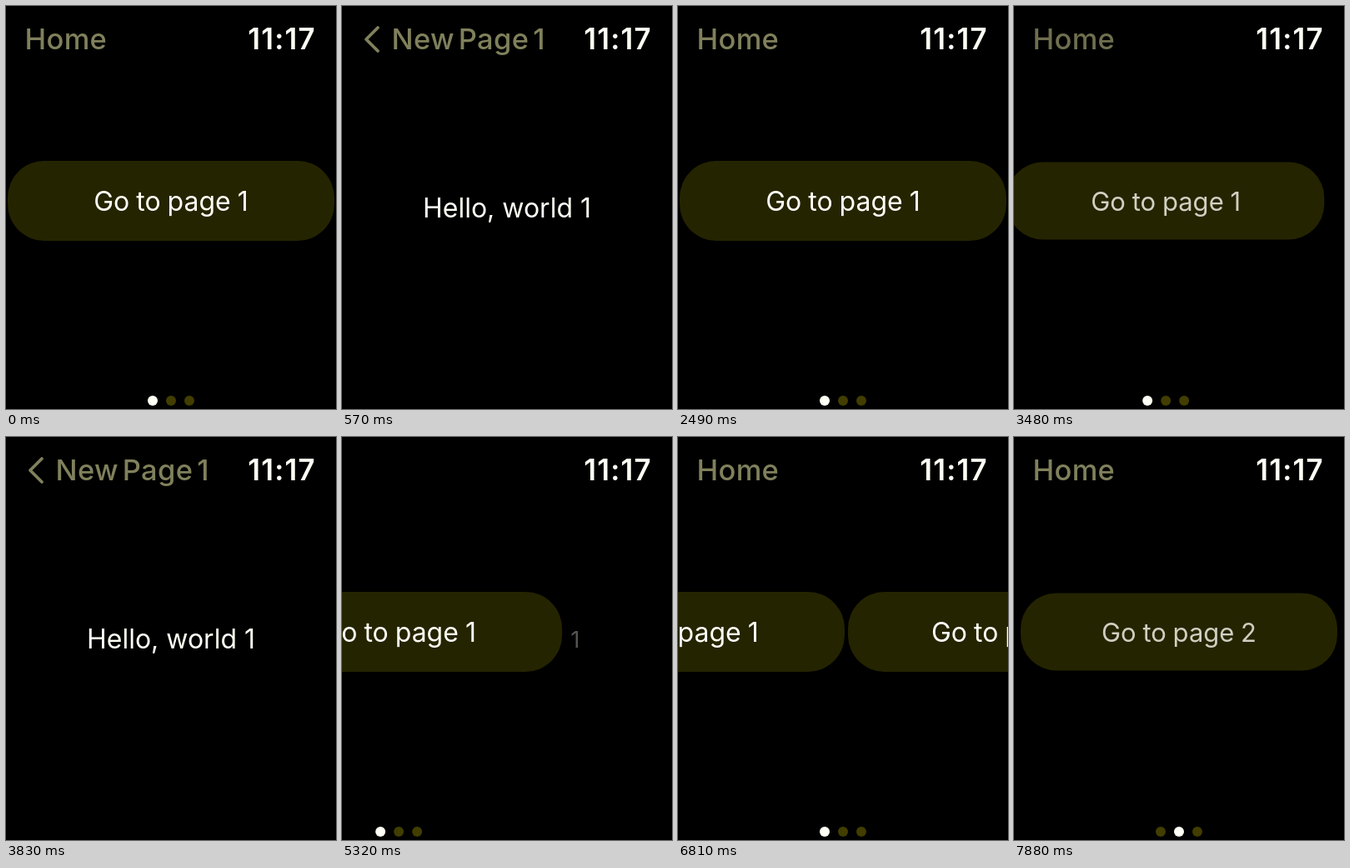
Recreate the animation shown at these times as an HTML page. Size 396 by 484 pixels, loop 8000 ms.

```html
<!DOCTYPE html>
<html lang="en">
<head>
<meta charset="utf-8">
<title>Watch navigation</title>
<style>
  html, body { margin: 0; width: 100%; height: 100%; overflow: hidden; background: #000; }
  svg { display: block; width: 100%; height: 100%; font-family: Inter, Roboto, sans-serif; }
  .body { font-size: 32px; fill: #fffff6; text-anchor: middle; }
  .button .body { word-spacing: -1px; }
  .title { font-size: 34.5px; font-weight: 500; fill: #80805c; letter-spacing: .3px; word-spacing: -4.5px; }
  .clock { font-size: 35px; font-weight: 600; fill: #fffff6; letter-spacing: 1.2px; text-anchor: end; }
  .pill { fill: #252400; }
  .chevron { fill: none; stroke: #80805c; stroke-width: 3.8; stroke-linecap: round; stroke-linejoin: round; }
</style>
</head>
<body>
<svg viewBox="0 0 396 484">
  <clipPath id="screen"><rect width="396" height="484"/></clipPath>
  <rect width="396" height="484"/>
  <text id="hello" class="body" x="198" y="254">Hello, world 1</text>
  <g id="home" clip-path="url(#screen)">
    <rect width="396" height="484"/>
    <g id="pages">
      <g class="button">
        <rect class="pill" x="2" y="186" width="392" height="96" rx="44"/>
        <text class="body" x="198" y="246">Go to page 1</text>
      </g>
      <g transform="translate(396 0)">
        <g class="button">
          <rect class="pill" x="2" y="186" width="392" height="96" rx="44"/>
          <text class="body" x="198" y="246">Go to page 2</text>
        </g>
      </g>
    </g>
    <circle class="dot" cx="176" cy="474" r="6"/>
    <circle class="dot" cx="198" cy="474" r="6"/>
    <circle class="dot" cx="220" cy="474" r="6"/>
  </g>
  <text id="homeTitle" class="title" x="22.5" y="52">Home</text>
  <g id="pageTitle">
    <path id="chevron" class="chevron" d="M43 26 29 40 43 54"/>
    <text class="title" x="59.5" y="52">New Page 1</text>
  </g>
  <text class="clock" x="372" y="52">11:17</text>
</svg>
<script>
  const LOOP = 8000;
  const WIDTH = 396;
  const SLIDE = [.04, .18, .43, .672, .88, 1];
  const SWIPE = [.03, .11, .22, .35, .49, .7, .87, .97, 1];
  const TAP = [.2, .45, .7, .9, 1];

  const el = id => document.getElementById(id);
  const home = el('home'), pages = el('pages'), hello = el('hello');
  const homeTitle = el('homeTitle'), pageTitle = el('pageTitle'), chevron = el('chevron');
  const buttons = document.querySelectorAll('.button');
  const dots = document.querySelectorAll('.dot');

  const clamp = v => Math.max(0, Math.min(1, v));
  const within = (t, a, b) => t >= a && t < b;

  // Value of a stepped curve whose first step lands on start and last on end
  function step(t, start, end, curve) {
    if (t < start) return 0;
    const last = curve.length - 1;
    const i = Math.floor((t + 6 - start) / (end - start) * last);
    return curve[Math.min(last, i)];
  }

  function scaleAt(node, s, cy) {
    node.setAttribute('transform', `translate(198 ${cy}) scale(${s}) translate(-198 ${-cy})`);
  }

  function press(button, amount) {
    scaleAt(button, 1 - .031 * amount, 234);
    button.lastElementChild.style.opacity = 1 - .22 * amount;
  }

  function draw(t) {
    const push = step(t, 3480, 3830, SLIDE);
    const pop = step(t, 2130, 2490, SLIDE) + step(t, 5110, 5470, SLIDE);
    const slide = (t >= 570) + push - pop;
    const swipe = step(t, 6530, 7100, SWIPE);

    home.setAttribute('transform', `translate(${-WIDTH * slide} 0)`);
    pages.setAttribute('transform', `translate(${-WIDTH * swipe} 0)`);

    scaleAt(hello, .8 + .2 * slide, 243);
    hello.style.opacity = clamp(slide);

    homeTitle.style.opacity = clamp(1 - slide * 3.2);
    pageTitle.style.opacity = clamp(slide * 2.2 - 1.2);
    const back = within(t, 1990, 2490) || within(t, 4970, 5470);
    chevron.style.opacity = back ? .27 : 1;

    press(buttons[0], within(t, 500, 570) ? .4 : step(t, 3050, 3340, TAP) - push);
    press(buttons[1], step(t, 7600, 7880, TAP));

    const current = swipe > .5 ? 1 : 0;
    dots.forEach((dot, i) => dot.setAttribute('fill', i === current ? '#fffff6' : '#413e00'));
  }

  const begin = performance.now();
  function tick() {
    draw((performance.now() - begin) % LOOP);
    requestAnimationFrame(tick);
  }
  draw(0);
  requestAnimationFrame(tick);
</script>
</body>
</html>
```
